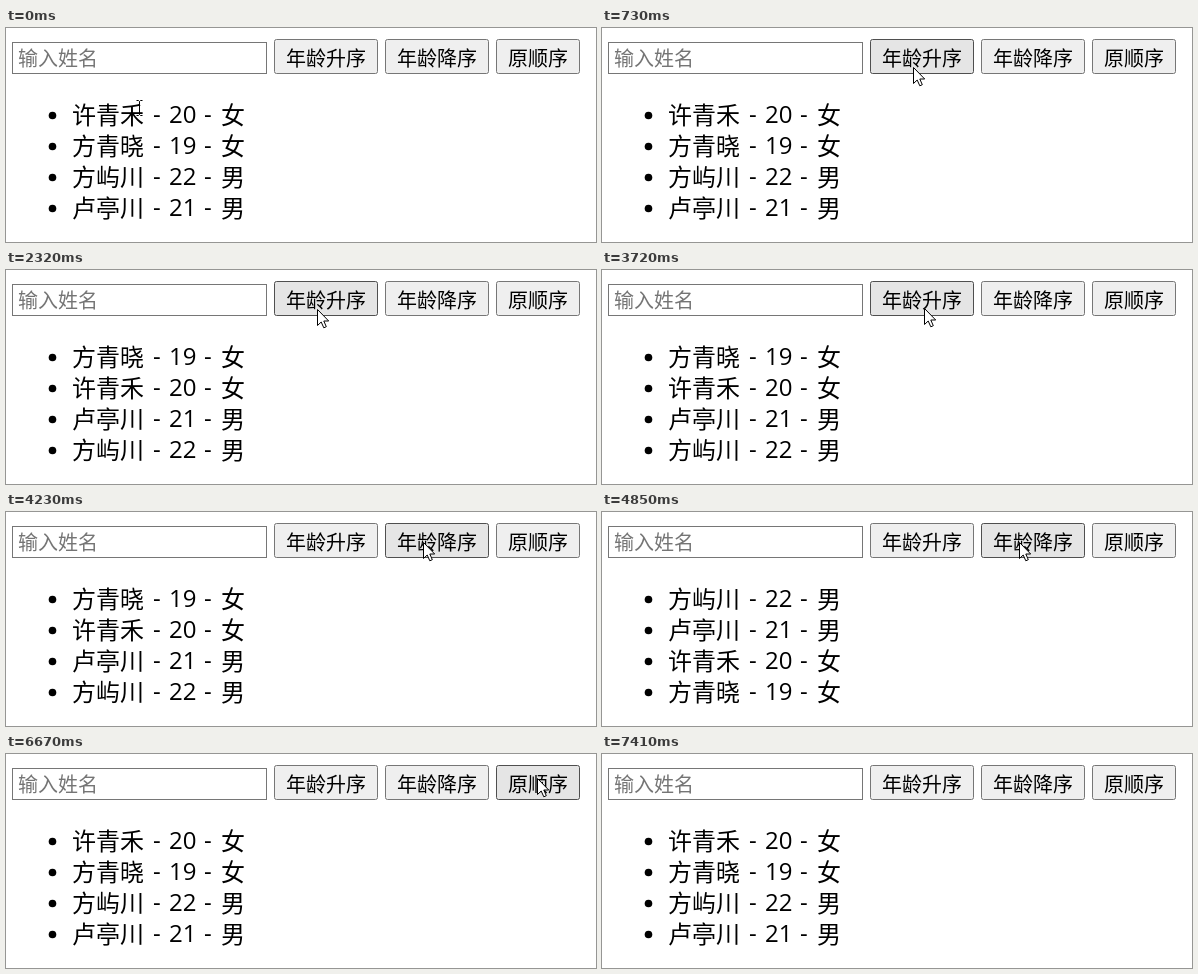
An HTML page for the animation above (7.97 s loop, 590x214 px).

```html
<!DOCTYPE html>
<html lang="zh-CN">
<head>
<meta charset="utf-8">
<style>
  html, body { margin: 0; width: 100%; height: 100%; overflow: hidden; background: #fff; }
  svg { display: block; width: 590px; height: 214px; font-family: "Noto Sans CJK SC", "Noto Sans CJK", "Noto Sans CJK JP", sans-serif; }
  text { white-space: pre; }
  .label { font-size: 20px; }
  .row { font-size: 24px; }
  .latin { font-family: "Open Sans", "Noto Sans", sans-serif; }
  .button { fill: #efefef; stroke: #767676; }
  .hover { fill: #e5e5e5; stroke: #4f4f4f; }
  .active { fill: #f5f5f5; stroke: #8d8d8d; }
</style>
</head>
<body>
<svg id="stage" viewBox="0 0 590 214"></svg>
<script>
const LOOP = 7970;
const stage = document.getElementById('stage');

function add(tag, attrs, text = '') {
  const el = document.createElementNS('http://www.w3.org/2000/svg', tag);
  for (const key in attrs) el.setAttribute(key, attrs[key]);
  el.textContent = text;
  return stage.appendChild(el);
}

// Form
add('rect', { x: 6.5, y: 14.5, width: 254, height: 31, fill: '#fff', stroke: '#767676' });
add('text', { x: 12, y: 38, class: 'label', fill: '#757575' }, '输入姓名');

const buttons = [[268, 104, '年龄升序'], [379, 104, '年龄降序'], [490, 84, '原顺序']].map(([x, w, label]) => {
  const rect = add('rect', { x: x + .5, y: 11.5, width: w - 1, height: 34, rx: 2, class: 'button' });
  add('text', { x: x + 12, y: 38, class: 'label' }, label);
  return { x, w, rect };
});

// List
const people = [['许青禾', 20, '女'], ['方青晓', 19, '女'], ['方屿川', 22, '男'], ['卢亭川', 21, '男']];
const ascending = [...people].sort((a, b) => a[1] - b[1]);
const descending = [...ascending].reverse();

const rows = people.map((_, i) => {
  const y = 96 + 31 * i;
  const cell = (x, latin, text) =>
    add('text', { x, y: latin ? y - 1 : y, class: latin ? 'row latin' : 'row' }, text);
  add('circle', { cx: 46.5, cy: y - 8.5, r: 3.8 });
  cell(147, true, '-');
  cell(198, true, '-');
  return [cell(66, false), cell(163, true), cell(215, false)];
});

// Mouse pointers
const arrow = add('path', {
  d: 'M.5 .5V16.5L4.2 13L6.8 18.8L9.3 17.7L6.8 12H11.7Z',
  fill: '#fff', stroke: '#000', 'stroke-width': 1
});
const beam = add('path', {
  d: 'M-3-7.5H-1L0-6.5L1-7.5H3M0-6.5V6.5M-3 7.5H-1L0 6.5L1 7.5H3',
  fill: 'none', stroke: '#000', 'stroke-width': 1
});

// Pointer stops: time, x, y
const stops = [
  [0, 133.5, 80], [280, 158, 92], [370, 203, 97], [460, 252, 80], [550, 290, 58], [640, 306, 45], [730, 311, 39],
  ...glide(3720, 4230, 7, [322, 38], [417, 30]),
  ...glide(5750, 6110, 5, [432, 29], [531, 24]),
  [7320, 533, 48], [7410, -99, -99]
];
const presses = [[2230, 2320], [4670, 4850], [6490, 6670]];
const orders = [[0, people], [2320, ascending], [4850, descending], [6670, people]];

function glide(start, end, count, from, to) {
  return Array.from({ length: count }, (_, i) => {
    const p = i / (count - 1), ease = p * p * (3 - 2 * p);
    return [start + (end - start) * p, ...from.map((v, k) => Math.round(v + (to[k] - v) * ease))];
  });
}

const latest = (list, t) => list.filter(item => item[0] <= t).pop();

function draw(t) {
  const [, x, y] = latest(stops, t);
  const overText = t < 460;
  beam.setAttribute('visibility', overText ? 'visible' : 'hidden');
  arrow.setAttribute('visibility', overText ? 'hidden' : 'visible');
  (overText ? beam : arrow).setAttribute('transform', `translate(${x} ${y})`);

  const pressed = presses.some(([a, b]) => t >= a && t < b);
  for (const b of buttons) {
    const inside = x >= b.x && x < b.x + b.w && y >= 11 && y < 46;
    b.rect.setAttribute('class', 'button' + (inside ? pressed ? ' active' : ' hover' : ''));
  }

  const order = latest(orders, t)[1];
  rows.forEach((cells, i) => cells.forEach((cell, k) => {
    if (cell.textContent !== String(order[i][k])) cell.textContent = order[i][k];
  }));
}

const begin = performance.now();
function frame() {
  draw((performance.now() - begin) % LOOP);
  requestAnimationFrame(frame);
}
frame();
</script>
</body>
</html>
```
